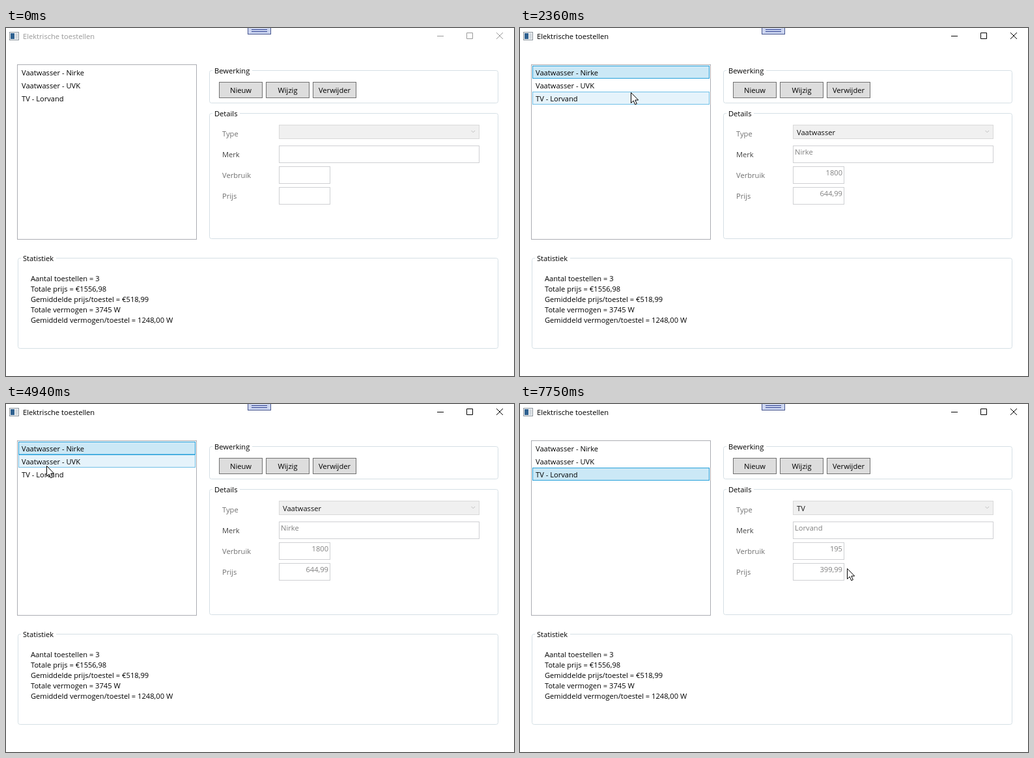
These frames come from a looping animation (780x536 px, 8 s). An HTML page:

```html
<!DOCTYPE html>
<html lang="nl">
<head>
<meta charset="utf-8">
<title>Elektrische toestellen</title>
<style>
  html, body { margin: 0; width: 100%; height: 100%; overflow: hidden; background: #fff; }
  svg { display: block; }
  text { font: 11.15px "Open Sans", "Noto Sans", sans-serif; white-space: pre; }
</style>
</head>
<body>
<svg id="stage" width="780" height="536" viewBox="0 0 780 536"></svg>
<script>
const LOOP = 8000;
const items = [
  { type: "Vaatwasser", brand: "Nirke", power: "1800", price: "644,99" },
  { type: "Vaatwasser", brand: "UVK", power: "1750", price: "512,00" },
  { type: "TV", brand: "Lorvand", power: "195", price: "399,99" }
];
const clicks = [
  { from: 1830, to: 1960, row: 0 },
  { from: 5090, to: 5230, row: 1 },
  { from: 6420, to: 6500, row: 2 }
];
// start, end, number of steps, points the pointer passes
const moves = [
  [500, 970, 7, [[745, 404], [57, 66]]],
  [2280, 2450, 3, [[170, 99], [399, 168]]],
  [2600, 3400, 11, [[404, 176], [443, 281], [350, 129]]],
  [3470, 3930, 7, [[362, 133], [499, 175], [483, 161]]],
  [4490, 4940, 7, [[481, 160], [62, 95]]],
  [5880, 5970, 2, [[65, 101], [69, 108]]],
  [6820, 6970, 3, [[150, 116], [355, 138]]],
  [7110, 7750, 9, [[363, 142], [522, 238], [502, 253]]]
];

const stage = document.getElementById("stage");

function add(tag, attrs, content) {
  const el = document.createElementNS("http://www.w3.org/2000/svg", tag);
  for (const key in attrs) el.setAttribute(key, attrs[key]);
  if (content) el.textContent = content;
  stage.append(el);
  return el;
}
// 1px outline covering the pixels from (x, y) up to (x + w, y + h)
const box = (x, y, w, h, fill, stroke, rx = 0) =>
  add("rect", { x: x + .5, y: y + .5, width: w - 1, height: h - 1, fill, stroke, rx });
const label = (x, y, content, fill = "#000", anchor = "start") =>
  add("text", { x, y, fill, "text-anchor": anchor }, content);
const line = (d, stroke) => add("path", { d, stroke, fill: "none" });
const show = (el, on) => el.setAttribute("visibility", on ? "visible" : "hidden");

function group(x, y, w, h, title, gap) {
  box(x, y, w, h, "none", "#d5dfe5", 3);
  add("rect", { x: x + 5, y: y - 1, width: gap, height: 3, fill: "#fff" });
  label(x + 8, y + 5, title);
}

// Title bar
box(5, 6, 15, 13, "#f4f6f8", "#8b949c");
add("rect", { x: 7, y: 8, width: 6, height: 9, fill: "#2f6190" });
add("rect", { x: 14, y: 8, width: 4, height: 9, fill: "#d3d9de" });
const title = label(26, 17, "Elektrische toestellen");
const controls = [
  line("M662 12.5h10", "#000"),
  line("M707.5 7.5h9v9h-9z", "#000"),
  line("M753 7l10 10M763 7l-10 10", "#000")
];
box(371, -2, 36, 12, "#ccd5f0", "#47568f");
line("M377 2.5h24M377 5.5h24", "#2f4190");

// List
box(17, 56, 276, 270, "#fff", "#abadb3");
const hoverBar = box(19, 58, 272, 20, "#e5f3fb", "#70c0e7");
const pickBar = box(19, 58, 272, 20, "#cbe8f6", "#26a0da");
items.forEach((item, i) => label(24, 73 + 20 * i, `${item.type} - ${item.brand}`));

// Commands
group(312, 65, 444, 51, "Bewerking", 61);
["Nieuw", "Wijzig", "Verwijder"].forEach((name, i) => {
  const x = 327 + 72 * i;
  box(x, 83, 67, 25, "#ddd", "#707070");
  label(x + 33.5, 100, name, "#000", "middle");
});

// Details
group(312, 131, 444, 194, "Details", 42);
["Type", "Merk", "Verbruik", "Prijs"].forEach((name, i) =>
  label(332, 167 + 32 * i, name, i === 1 ? "#444" : "#707070"));
box(419, 149, 308, 22, "#f0f0f0", "#d9d9d9");
line("M714.5 158l2.8 2.8 2.8-2.8", "#bfbfbf");
box(419, 181, 308, 27, "#fff", "#cfd0d3");
box(419, 213, 79, 27, "#fff", "#cfd0d3");
box(419, 245, 79, 27, "#fff", "#cfd0d3");
const fields = {
  type: label(425, 165, "", "#111"),
  brand: label(422, 195, "", "#808080"),
  power: label(495, 227, "", "#808080", "end"),
  price: label(495, 259, "", "#808080", "end")
};

// Statistics
group(18, 354, 738, 140, "Statistiek", 54);
[
  "Aantal toestellen = 3",
  "Totale prijs = €1556,98",
  "Gemiddelde prijs/toestel = €518,99",
  "Totale vermogen = 3745 W",
  "Gemiddeld vermogen/toestel = 1248,00 W"
].forEach((text, i) => label(38, 390 + 16 * i, text));

// Pointer
const halo = add("circle", { r: 12, fill: "#f0ec3c", opacity: .7 });
const pointer = add("path", {
  d: "M.5 .5V16.5L4.2 13 6.7 18.8 9.3 17.7 6.8 12H11.7Z",
  fill: "#fff", stroke: "#000"
});

const smooth = u => u * u * (3 - 2 * u);

function pointerAt(t) {
  const move = moves.filter(m => t >= m[0]).pop();
  if (!move) return null;
  const [from, to, steps, points] = move;
  const last = steps - 1;
  const step = Math.min(last, Math.floor((t - from) / (to - from) * last + 1e-6));
  const pos = step / last * (points.length - 1);
  const i = Math.min(Math.floor(pos), points.length - 2);
  const u = smooth(pos - i);
  return points[i].map((v, k) => Math.round(v + (points[i + 1][k] - v) * u));
}

function rowAt([x, y]) {
  const row = Math.floor((y - 58) / 20);
  return x >= 19 && x < 291 && row >= 0 && row < items.length ? row : -1;
}

function draw(t) {
  const click = clicks.filter(c => t >= c.from).pop();
  const picked = click ? click.row : -1;
  const at = pointerAt(t);
  const hover = at ? rowAt(at) : -1;

  title.setAttribute("fill", click ? "#000" : "#999");
  controls.forEach(c => c.setAttribute("stroke", click ? "#000" : "#999"));
  for (const key in fields) fields[key].textContent = click ? items[picked][key] : "";

  show(pickBar, picked >= 0);
  pickBar.setAttribute("y", 58.5 + 20 * picked);
  show(hoverBar, hover >= 0 && hover !== picked);
  hoverBar.setAttribute("y", 58.5 + 20 * hover);

  show(pointer, at);
  show(halo, click && t < click.to);
  if (at) {
    const place = `translate(${at[0]} ${at[1]})`;
    pointer.setAttribute("transform", place);
    halo.setAttribute("transform", place);
  }
}

const start = performance.now();
function tick() {
  draw((performance.now() - start) % LOOP);
  requestAnimationFrame(tick);
}
draw(0);
requestAnimationFrame(tick);
</script>
</body>
</html>
```
